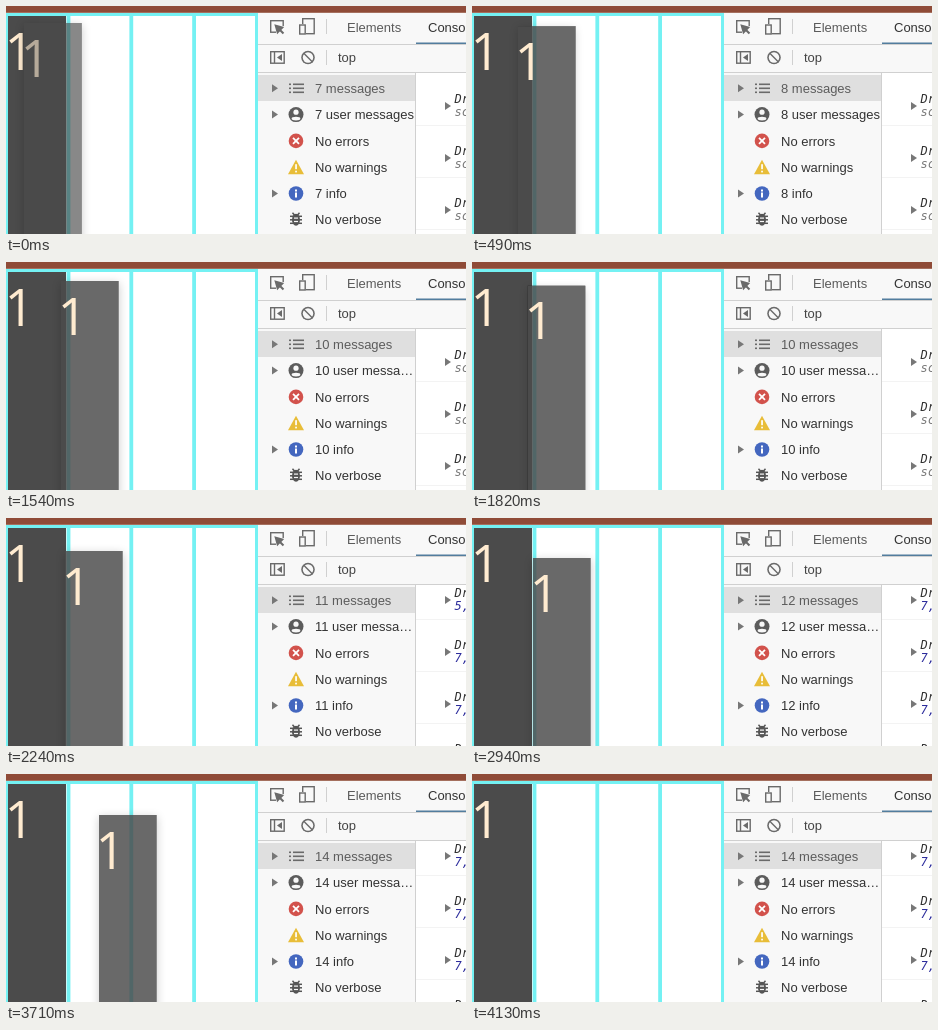
An HTML page with a canvas that plays this animation: 460 by 228 pixels, repeating every 4.2 s.

```html
<!DOCTYPE html>
<html lang="en">
<head>
<meta charset="utf-8">
<title>Drag between columns</title>
<style>
html, body { margin: 0; width: 100%; height: 100%; overflow: hidden; background: #fff; }
canvas { display: block; width: 460px; height: 228px; }
</style>
</head>
<body>
<canvas id="stage"></canvas>
<script>
const W = 460, H = 228, LOOP = 4200, STEP = 70, DROP = 4060;
const SPLIT = 252, LOG_X = 410, ROW = 26.3, ENTRY = 52;
const canvas = document.getElementById('stage');
const c = canvas.getContext('2d');
const scale = window.devicePixelRatio || 1;
canvas.width = W * scale;
canvas.height = H * scale;

const SANS = '13px "Liberation Sans", Arial, sans-serif';
const MONO = 'italic 12px "DejaVu Sans Mono", monospace';
const DIGIT = '52px "Open Sans", "Noto Sans", sans-serif';
const CYAN = '#74f1f3', ICON = '#6a6a6a', LINE = '#d0d0d0', PANEL = '#f8f8f8';

// key points of the dragged card
const PATH = [
  { t: 0, x: 18, y: 17 }, { t: 910, x: 64, y: 22 }, { t: 1540, x: 55, y: 19 },
  { t: 2240, x: 59, y: 33 }, { t: 2940, x: 61, y: 40 }, { t: 3710, x: 93, y: 41 }
];

function box(x, y, w, h, color) {
  c.fillStyle = color;
  c.fillRect(x, y, w, h);
}

function text(s, x, y, color, font = SANS) {
  c.font = font;
  c.fillStyle = color;
  c.fillText(s, x, y);
}

function disc(x, y, rx, color, ry = rx) {
  c.beginPath();
  c.ellipse(x, y, rx, ry, 0, 0, Math.PI * 2);
  c.fillStyle = color;
  c.fill();
}

function line(x1, y1, x2, y2, color = ICON, width = 1.4) {
  c.beginPath();
  c.moveTo(x1, y1);
  c.lineTo(x2, y2);
  c.strokeStyle = color;
  c.lineWidth = width;
  c.stroke();
}

function outline(x, y, w, h) {
  c.strokeStyle = ICON;
  c.lineWidth = 1.4;
  c.strokeRect(x, y, w, h);
}

// triangle with its base at x and its tip at x + w
function arrow(x, y, w = 6, half = 4, color = '#777') {
  c.beginPath();
  c.moveTo(x, y - half);
  c.lineTo(x + w, y);
  c.lineTo(x, y + half);
  c.fillStyle = color;
  c.fill();
}

function spline(t, k) {
  const last = PATH.length - 1;
  let i = 0;
  while (i < last - 1 && t >= PATH[i + 1].t) i++;
  const slope = j => {
    const a = PATH[Math.max(j - 1, 0)], b = PATH[Math.min(j + 1, last)];
    return (b[k] - a[k]) / (b.t - a.t);
  };
  const p = PATH[i], q = PATH[i + 1], d = q.t - p.t;
  const u = Math.min(1, (t - p.t) / d), v = 1 - u;
  return v * v * (1 + 2 * u) * p[k] + u * u * (3 - 2 * u) * q[k]
    + u * v * d * (v * slope(i) - u * slope(i + 1));
}

function card(x, y, w, alpha = 1, inkAlpha = 1) {
  c.globalAlpha = alpha;
  box(x, y, w, H, '#4b4b4b');
  c.globalAlpha = inkAlpha;
  text('1', x - 3.5, y + 53.7, '#ffebd0', DIGIT);
  c.globalAlpha = 1;
}

function shadow(x, y, w) {
  c.save();
  c.beginPath();
  c.rect(0, 0, W, H);
  c.rect(x, y, w, H);
  c.clip('evenodd');
  c.shadowColor = 'rgba(0,0,0,0.2)';
  c.shadowBlur = 9 * scale;
  c.shadowOffsetY = 2 * scale;
  box(x, y, w, H, '#000');
  c.restore();
}

function board(t) {
  box(0, 7, SPLIT, 3, CYAN);
  box(0, 7, 2, H, CYAN);
  for (let i = 1; i < 5; i++) box(62.8 * i - 2.2, 7, 3.8, H, CYAN);
  card(2, 10, 58);
  if (t >= DROP) return;

  const x = spline(t, 'x'), y = spline(t, 'y');
  shadow(x, y, 57.5);
  card(x, y, 57.5, Math.min(0.83, 0.66 + t / 1300), Math.min(1, 0.6 + t / 700));
}

function toolbars() {
  box(SPLIT, 6, W, 61, PANEL);
  for (const y of [38, 66]) box(SPLIT, y, W, 1, LINE);
  for (const y of [13, 44]) box(320, y, 1, 15, LINE);

  // element picker
  outline(264.7, 14.7, 12.5, 11.5);
  box(270, 20, 9, 8, PANEL);
  c.save();
  c.translate(269, 19);
  c.rotate(-Math.PI * 3 / 4);
  arrow(-8, 0, 9, 5, ICON);
  line(-12, 0, -7, 0, ICON, 2);
  c.restore();

  // device toggle
  outline(296.7, 12.7, 11.5, 15);
  box(292, 18, 8, 11, PANEL);
  outline(293.7, 19, 5.5, 9);

  text('Elements', 341, 26, '#5a5a5a');
  text('Console', 422, 26, '#333');
  box(LOG_X, 36.5, 50, 1.5, '#527d9e');

  // sidebar toggle
  outline(264.7, 45.7, 13.5, 11.5);
  line(268.5, 45, 268.5, 57);
  arrow(276, 51.5, -5, 3.5, ICON);

  // clear
  disc(302, 51.5, 6.8, ICON);
  disc(302, 51.5, 5.2, PANEL);
  line(297.8, 47.3, 306.2, 55.7);
  text('top', 332, 56, '#444');
}

const icons = [
  function list(x, y) {
    for (const d of [-4, 0, 4]) {
      box(x - 7, y + d - 0.8, 2, 1.6, ICON);
      box(x - 3, y + d - 0.8, 11, 1.6, ICON);
    }
  },
  function user(x, y) {
    disc(x, y, 7.5, '#5c5c5c');
    disc(x, y - 2.4, 2.6, PANEL);
    disc(x, y + 4, 4.4, PANEL, 1.9);
  },
  function error(x, y) {
    disc(x, y, 7.3, '#d2524c');
    for (const s of [-3, 3]) line(x - 3, y - s, x + 3, y + s, '#fff', 1.8);
  },
  function warning(x, y) {
    c.save();
    c.translate(x, y);
    c.rotate(-Math.PI / 2);
    arrow(-7, 0, 14.5, 8, '#e8bd38');
    c.restore();
    box(x - 0.8, y - 3, 1.7, 5, '#fff');
    box(x - 0.8, y + 3.5, 1.7, 1.7, '#fff');
  },
  function info(x, y) {
    disc(x, y, 7.3, '#4467bf');
    box(x - 1, y - 4, 2, 2, '#fff');
    box(x - 1, y - 1, 2, 5, '#fff');
  },
  function bug(x, y) {
    disc(x, y, 4, '#555', 6);
    for (const d of [-3.5, 0, 3.5]) line(x - 6, y + d, x + 6, y + d, '#555', 1.5);
    for (const s of [-1, 1]) {
      line(x + 3.5 * s, y - 7, x + s, y - 4, '#555', 1.5);
      line(x - 2, y + 1.7 * s, x + 2, y + 1.7 * s, PANEL, 1.2);
    }
  }
];

function sidebar(n) {
  box(SPLIT, 67, 158, H, PANEL);
  box(SPLIT, 69, 157, 26, '#dfdfdf');
  box(409, 67, 1, H, LINE);
  const rows = [
    n + ' messages',
    n + (n < 10 ? ' user messages' : ' user messa…'),
    'No errors', 'No warnings', n + ' info', 'No verbose'
  ];
  rows.forEach((label, i) => {
    const y = 82.3 + i * ROW;
    text(label, 309, Math.round(y + 4.6), i ? '#333' : '#5c5c5c');
    icons[i](290, y);
    if (label.startsWith(n)) arrow(266, y);
  });
}

function log(n) {
  const late = n > 10;
  box(LOG_X, 67, 50, H, '#fff');
  c.save();
  c.beginPath();
  c.rect(LOG_X, 67, 50, H);
  c.clip();
  for (let i = 0; i < 4; i++) {
    const y = (late ? 75 : 93) + i * ENTRY;
    box(LOG_X, y + 26, 50, 1, '#f3f3f3');
    arrow(439, y + 7);
    text('DragEvent', 448.5, y + 4, '#303030', MONO);
    if (late) text(n === 11 && !i ? '5,' : '7,', 448.5, y + 17, '#2c2c9c', MONO);
    else text('screenX', 448.5, y + 17, '#777', MONO);
  }
  c.restore();
}

function draw(t) {
  const n = 7 + Math.floor(t / 540 + 0.2);
  c.setTransform(scale, 0, 0, scale, 0, 0);
  box(0, 0, W, H, '#fff');
  board(t);
  toolbars();
  sidebar(n);
  log(n);
  box(0, 0, W, 6, '#8f4b37');
  box(0, 6, W, 1, '#a5705f');
}

const start = performance.now();
function tick(now) {
  const t = Math.max(0, now - start) % LOOP;
  draw(Math.floor(t / STEP) * STEP);
  requestAnimationFrame(tick);
}
draw(0);
requestAnimationFrame(tick);
</script>
</body>
</html>
```
